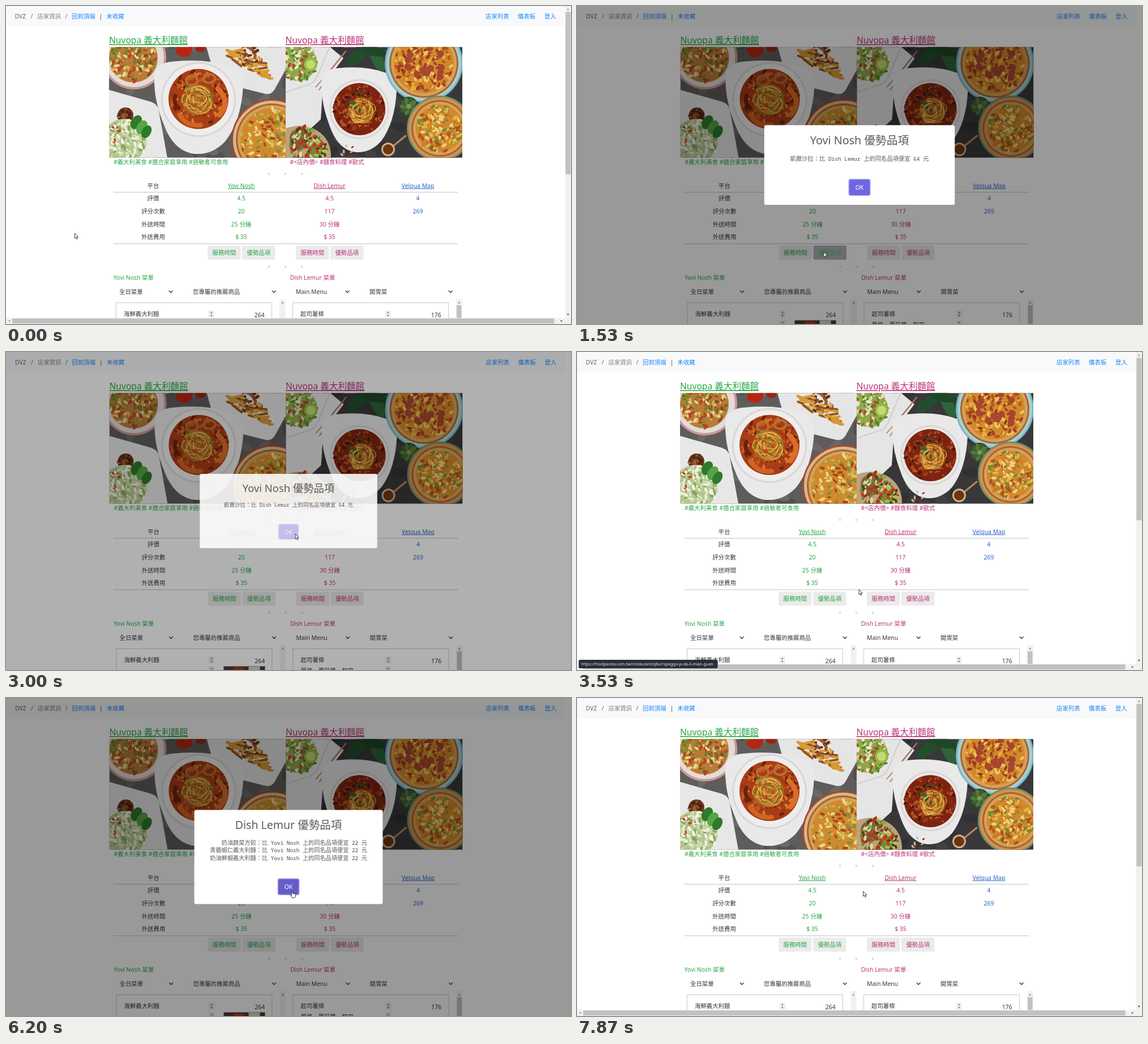
An HTML page that plays this animation: 998x561 px, repeating every 8390 ms.

```html
<!DOCTYPE html>
<html lang="zh-Hant">
<head>
<meta charset="utf-8">
<title>店家資訊</title>
<style>
html, body { margin: 0; width: 100%; height: 100%; overflow: hidden; background: #fff; }
svg { display: block; width: 998px; height: 561px; }
text { font: 10.4px "Noto Sans", "Noto Sans CJK TC", "Noto Sans CJK", sans-serif; white-space: pre; }
.name { font-size: 15.6px; }
.link { text-decoration: underline; }
.mid { text-anchor: middle; }
.end { text-anchor: end; }
.heading { font-size: 19.5px; font-weight: 500; fill: #595959; }
.pre { font-size: 10.2px; fill: #595959; }
.code { font-family: "Noto Sans Mono", monospace; font-size: 9.35px; fill: #444; }
.status { font-size: 7.1px; fill: #e6e8ea; }
</style>
</head>
<body>
<svg id="stage" viewBox="0 0 998 561"></svg>
<script>
const LOOP = 8390, STEP = 1000 / 15; // the screen refreshes 15 times a second
const GREEN = '#28a745', PINK = '#bb3478', BLUE = '#2a66cc', NAV_BLUE = '#1a87ff', INK = '#33383d';
const SHOP = 'Nuvopa 義大利麵館', SERVICE_A = 'Yovi Nosh', SERVICE_B = 'Dish Lemur', MAPS = 'Velqua Map';

let seed = 7;
const rand = () => (seed = (seed * 16807) % 2147483647) / 2147483647;

// Shape helpers
const text = (x, y, s, fill = INK, cls = '') => `<text x="${x}" y="${y}" fill="${fill}" class="${cls}">${s}</text>`;
const rect = (x, y, w, h, fill, more = '') => `<rect x="${x}" y="${y}" width="${w}" height="${h}" fill="${fill}" ${more}/>`;
const oval = (x, y, rx, ry, fill, turn = 0) =>
  `<ellipse cx="${x}" cy="${y}" rx="${rx}" ry="${ry}" fill="${fill}" transform="rotate(${turn} ${x} ${y})"/>`;
const disc = (x, y, r, fill) => oval(x, y, r, r, fill);
const shape = (d, fill) => `<path d="${d}" fill="${fill}"/>`;
const stroke = (d, color, width = 1) =>
  `<path d="${d}" fill="none" stroke="${color}" stroke-width="${width}" stroke-linecap="round"/>`;
const repeat = (n, make) => Array.from({ length: n }, (_, i) => make(i)).join('');

// Food helpers
function scatter(x, y, r, n, size, colors) {
  return repeat(n, i => {
    const a = rand() * 2 * Math.PI, d = r * Math.sqrt(rand()), s = size * (0.6 + rand() * 0.8);
    return oval((x + d * Math.cos(a)).toFixed(1), (y + d * Math.sin(a)).toFixed(1),
      s.toFixed(1), (s * 0.5).toFixed(1), colors[i % colors.length], Math.round(rand() * 180));
  });
}
const noodles = (x, y, r) => disc(x, y, r * 0.9, '#b9792a') + repeat(22, i => {
  const rx = r * (0.35 + rand() * 0.55), ry = r * (0.3 + rand() * 0.5);
  return `<ellipse cx="${x + (rand() - 0.5) * r * 0.5}" cy="${y + (rand() - 0.5) * r * 0.5}" rx="${rx}" ry="${ry}"
    fill="none" stroke="${i % 2 ? '#e9b84c' : '#8f4d18'}" transform="rotate(${rand() * 180} ${x} ${y})"/>`;
});
const bowl = (x, y, w, h) => `<g transform="translate(${x} ${y}) scale(${w / 100} ${h / 100})">` +
  shape('M3 20Q2 2 25 1Q60-2 84 6Q100 9 100 27Q98 65 80 87Q66 101 48 100Q25 98 14 70Q3 45 3 20', '#eae9ea') + '</g>';
const pizza = (x, y, r, rim, plate, toppings) => disc(x, y, r + 8, rim) + disc(x, y, r + 5, plate) +
  disc(x, y, r, '#a9642a') + disc(x, y, r - 3, '#d6a05c') + disc(x, y, r - 8, '#d08a2c') +
  scatter(x, y, r - 9, 170, 4, toppings);

function leftPhoto() {
  return rect(182, 72, 312, 196, '#5e5d5c') + scatter(338, 170, 180, 90, 12, ['#6a6968', '#525150']) +
    disc(226, 90, 57, '#c99a98') + disc(226, 90, 53, '#e4dbd8') + disc(225, 92, 43, '#b67c38') +
    scatter(225, 92, 41, 150, 4, ['#e0b355', '#8a4c22', '#e9d59a', '#b4481f', '#6f8a2d']) +
    disc(314, 75, 15, '#b92412') + disc(343, 71, 10, '#a3200f') + stroke('M300 74q8-8 16-3', '#4c7a2c', 3) +
    shape('M354 72L368 122Q372 133 386 137L458 155Q468 157 474 148L494 112V72Z', '#e6e5e6') +
    repeat(30, () => {
      const x = 388 + rand() * 66, y = 82 + (x - 388) * 0.5 + rand() * 22 - 10;
      return stroke(`M${x} ${y}l${8 + rand() * 14} ${rand() * 16 - 4}`, rand() > 0.4 ? '#d79a34' : '#945419', 4);
    }) + scatter(432, 88, 22, 40, 4, ['#5f3419', '#a5522b', '#d9a24d']) +
    bowl(257, 96, 162, 165) + disc(340, 165, 66, '#d8d6d6') + disc(340, 165, 63, '#efedec') +
    disc(340, 164, 53, '#a93c17') + scatter(340, 164, 50, 150, 4, ['#c65a20', '#6e220e', '#d97b2b', '#933a18']) +
    noodles(338, 165, 31) + stroke('M374 146q24 22 3 46', '#dc6c28', 9) + stroke('M306 192q14 22 38 18', '#cf6423', 8) +
    stroke('M318 133a10 8 0 1 0 20-3a10 8 0 1 0-20 3M350 125a10 7 0 1 0 18 6a10 7 0 1 0-18-6', '#b9702f', 4) +
    stroke('M299 158q-4 14 6 22', '#6a220e', 7) + scatter(340, 158, 26, 12, 3, ['#4d7a2a', '#d13c17']) +
    shape('M182 148L256 169Q268 173 270 185L285 268H182Z', '#e8e7e8') +
    disc(211, 193, 14, '#6b371d') + scatter(211, 193, 13, 24, 3, ['#9c5a30', '#4d2213']) +
    disc(209, 238, 39, '#b5c592') + scatter(209, 238, 38, 160, 4, ['#e6ecd0', '#86a656', '#f3f3e6', '#c8d8a8']) +
    oval(230, 205, 9, 13, '#2f7a2b', 30) + oval(240, 214, 9, 13, '#57a545', 30) + oval(248, 222, 8, 12, '#2f7a2b', 30) +
    scatter(195, 222, 20, 7, 3, ['#d43a1c']) +
    pizza(470, 236, 64, '#a9482c', '#d8b98c', ['#e3c25e', '#c2b45c', '#a94c1c', '#ecd78c', '#7f8f3c']);
}

function rightPhoto() {
  return rect(494, 72, 312, 196, '#38383a') + scatter(650, 170, 180, 60, 14, ['#414143', '#313133']) +
    shape('M494 72H572L596 92L560 140L556 200L532 222L494 222Z', '#e6e5e5') +
    stroke('M494 152L530 140Q543 138 549 126L572 72', '#cfcecd', 2) + disc(515, 98, 34, '#93a64c') +
    scatter(516, 98, 34, 130, 4, ['#d9dfb5', '#5d862a', '#efe9cf', '#a84e2a', '#87ad42']) +
    disc(538, 103, 12, '#8ebd3f') + disc(538, 103, 8, '#c3d977') +
    stroke('M600 80L558 132', '#a9745c', 2.5) + stroke('M563 125l-16 18M567 128l-14 20', '#a9745c', 1.5) +
    oval(622, 88, 26, 10, '#234e2c', -40) + oval(655, 92, 27, 10, '#2d6337', 65) + oval(645, 78, 28, 9, '#1e4727', 15) +
    bowl(553, 108, 137, 150) + disc(624, 182, 53, '#d9d7d7') + disc(624, 182, 50, '#ebe8e6') +
    disc(624, 182, 46, '#7c2411') + scatter(624, 182, 44, 160, 3.5, ['#9f3b18', '#4a160b', '#b95425', '#7c2411']) +
    noodles(627, 184, 25) + oval(612, 170, 7, 4, '#42622a', 20) + scatter(622, 168, 18, 14, 3, ['#c04a1f', '#38541f']) +
    pizza(738, 101, 61, '#7db4c0', '#a6d0d6', ['#e6b13c', '#b5581d', '#a53d28', '#edc75c', '#983626']) +
    repeat(12, () => disc(702 + rand() * 72, 72 + rand() * 66, 6, '#a8452f')) +
    disc(711, 177, 17, '#2f4a26') + repeat(10, i => oval(711 + 9 * Math.cos(i * 0.63), 177 + 9 * Math.sin(i * 0.63), 7, 4,
      i % 2 ? '#56763c' : '#405f30', i * 36)) + disc(711, 177, 4, '#7a9a56') +
    pizza(766, 216, 50, '#6f8f62', '#d39155', ['#e3b646', '#b54c1f', '#f0d27a', '#6f8a36', '#c87c2a']) +
    shape('M494 216Q525 205 550 220Q575 236 574 268H494Z', '#bfa27c') + disc(520, 234, 19, '#806038') +
    scatter(528, 243, 30, 110, 4.5, ['#5f8d31', '#b3341c', '#e4d3a5', '#5f3a1f', '#86ab45']) +
    disc(551, 254, 15, '#6b8f35') + scatter(551, 254, 14, 20, 5, ['#c93a22', '#a4bf5b', '#5a3219']) +
    stroke('M684 247L706 229', '#b98858', 3) + disc(675, 253, 12, '#d3b28c') + disc(675, 253, 9, '#6d3512') +
    scatter(603, 256, 14, 8, 3, ['#8a2a18', '#c2b59c']);
}

// Page
const button = (id, x, label, color) => rect(x, 422.5, 58.4, 25, '#ebebeb', 'rx="2.6"') +
  `<g id="${id}" opacity="0">${rect(x, 422.5, 58.4, 25, '#6c757d', 'rx="2.6"')}</g>` +
  text(x + 29.2, 438.8, label, color, 'mid') +
  `<g id="${id}Text" opacity="0">${text(x + 29.2, 438.8, label, '#fff', 'mid')}</g>`;
const dots = y => [464.5, 493.5, 522.5].map(x => disc(x, y, 2.2, '#e2e2e2')).join('');
const chevron = x => stroke(`M${x - 3} 502.5l3 3l3-3`, '#343a40', 1.3);
const triangle = (x, y, dx, dy, fill) =>
  shape(`M${x + dx} ${y + dy}L${x - dx + dy} ${y - dy + dx}L${x - dx - dy} ${y - dy - dx}Z`, fill);
const spinner = (x, y) => rect(x - 5, y - 6, 10, 12, '#ececec') +
  triangle(x, y - 3, 0, -1.4, '#666') + triangle(x, y + 3, 0, 1.4, '#666');

function row(y, label, a, b, c = '', cls = 'mid') {
  return text(260, y, label, INK, 'mid') + text(415.5, y, a, GREEN, cls) +
    text(571.5, y, b, PINK, cls) + text(727.5, y, c, BLUE, cls);
}
function menu(x, title, color, category, section, dish, price) {
  return text(x, 483, title, color) + text(x + 10.3, 507.6, category) + chevron(x + 101.5) +
    text(x + 140.4, 507.6, section) + chevron(x + 283.5) +
    `<rect x="${x + 4.7}" y="523.6" width="275" height="60" fill="#fff" stroke="#bdbdbd" stroke-width=".8"/>` +
    text(x + 18.3, 547, dish) + spinner(x + 173, 543.5) + text(x + 267, 548.8, price, INK, 'end') +
    rect(x + 293.5, 517, 10.5, 44, '#f1f1f1') + triangle(x + 298.7, 523, 0, -1.8, '#888') + spinner(x + 173, 561);
}
const page = () =>
  rect(-1, 0, 988.5, 36, '#f8f9fa') + text(15.5, 21.7, 'DVZ', '#666') + text(43.5, 21.7, '/', '#666') +
  text(55.5, 21.7, '店家資訊', '#808080') + text(104.5, 21.7, '/', '#666') +
  text(116, 21.7, '回到頂端', NAV_BLUE) + text(164.5, 21.7, '|', '#444') + text(177.5, 21.7, '未收藏', NAV_BLUE) +
  text(847, 21.7, '店家列表', NAV_BLUE) + text(904, 21.7, '儀表板', NAV_BLUE) + text(951, 21.7, '登入', NAV_BLUE) +
  text(182, 66.4, SHOP, GREEN, 'name link') + text(493.5, 66.4, SHOP, PINK, 'name link') +
  `<g clip-path="url(#leftClip)">${leftPhoto()}</g><g clip-path="url(#rightClip)">${rightPhoto()}</g>` +
  text(190, 279, '#義大利美食 #適合家庭享用 #過敏者可食用', GREEN) +
  text(501.5, 279, '#&lt;店內價&gt; #麵食料理 #歐式', PINK) + dots(296) +
  row(320.7, '平台', SERVICE_A, SERVICE_B, MAPS, 'mid link') + row(343.3, '評價', '4.5', '4.5', '4') +
  row(366.2, '評分次數', '20', '117', '269') + row(388.7, '外送時間', '25 分鐘', '30 分鐘') +
  row(411.4, '外送費用', '$ 35', '$ 35') +
  rect(189.5, 328, 608.5, 1, '#c4c4c4') + rect(189.5, 419, 608.5, 1, '#c4c4c4') +
  button('hoursA', 356.2, '服務時間', GREEN) + button('dealsA', 417.1, '優勢品項', GREEN) +
  button('hoursB', 512.1, '服務時間', PINK) + button('dealsB', 573, '優勢品項', PINK) + dots(460) +
  menu(189.7, SERVICE_A + ' 菜單', GREEN, '全日菜單', '您專屬的推薦商品', '海鮮義大利麵', '264') +
  menu(501.7, SERVICE_B + ' 菜單', PINK, 'Main Menu', '開胃菜', '起司薯條', '176') +
  rect(796, 528, 8.5, 33, '#c1c1c1') + text(520, 565.5, '薯條、蘑菇醬、起司') +
  rect(384, 554.5, 73, 7, '#4d3a34') + rect(402, 556, 18, 5, '#a83a1c') + rect(428, 555, 20, 6, '#d9d4cc');

const scrollbars = () => rect(987.5, 0, 10.5, 561, '#f1f1f1') + rect(0, 550.3, 998, 10.7, '#f1f1f1') +
  rect(988.3, 10.5, 9, 286.5, '#c1c1c1') + rect(11, 551.2, 957.5, 8.8, '#c1c1c1') +
  triangle(992.7, 5.5, 0, -1.7, '#8a8a8a') + triangle(992.7, 544.5, 0, 1.7, '#505050') +
  triangle(5.5, 555.6, -1.7, 0, '#8a8a8a') + triangle(981.5, 555.6, 1.7, 0, '#505050');

// Popups are drawn around their own centre.
const code = s => `<tspan class="code"> ${s} </tspan>`;
const deal = (dish, rival, saving) => `${dish}：比${code(rival)}上的同名品項便宜${code(saving)}元`;
const popup = (id, height, titleY, title, lines, okY) => `<g id="${id}">` +
  rect(-166.4, -height / 2, 332.8, height, '#fff', 'rx="3.2"') + text(0, titleY, title, '#595959', 'heading mid') + lines +
  `<g id="${id}Ok" fill="#7066e0"><rect x="-19.5" y="${okY - 15}" width="39" height="30" rx="4" fill-opacity=".5"/>` +
  `<rect x="-18" y="${okY - 13.6}" width="36" height="27.2" rx="2.6"/></g>` + text(0, okY + 3.8, 'OK', '#fff', 'mid') + '</g>';

const SCHEME = 'https:';
const stage = document.getElementById('stage');
stage.innerHTML =
  `<defs><clipPath id="leftClip">${rect(182, 72.5, 312, 195)}</clipPath>
   <clipPath id="rightClip">${rect(494, 72.5, 312, 195)}</clipPath></defs>
   <g id="page">${page()}</g><g id="bars">${scrollbars()}</g>
   <g id="status">${rect(3, 543, 245.5, 15, '#292e36', 'rx="2.5"') +
     text(7.3, 553.2, SCHEME + '//foodpanda.com.tw/restaurant/q8ur/spaggo-yi-da-li-mian-guan', '#e6e8ea', 'status')}</g>
   ${rect(0, 0, 998, 561, '#000', 'id="shade"')}` +
  popup('popupA', 139.2, -36, SERVICE_A + ' 優勢品項', text(0, -7.8, deal('凱撒沙拉', SERVICE_B, '64'), '#595959', 'pre mid'), 39) +
  popup('popupB', 166, -49.5, SERVICE_B + ' 優勢品項',
    ['奶油蔬菜方餃', '青醬蝦仁義大利麵', '奶油鮮蝦義大利麵'].map((dish, i) =>
      text(139, -21.8 + i * 13.5, deal(dish, SERVICE_A, '22'), '#595959', 'pre end')).join(''), 52.5) +
  `<g id="cursor" stroke="#111" stroke-width=".8" stroke-linejoin="round">
   <path id="arrow" fill="#fff" d="M0 0V8.8L2 7L3.4 10.2L4.9 9.5L3.5 6.4H6.2Z"/>
   <path id="hand" fill="#fff" d="M-.9 .6Q0-.5.9.6V4Q2 3.2 2.8 4.3Q3.8 3.7 4.5 4.8Q6 4.4 6 6V8.2Q6 10 4.8 11.4H-.3L-3.2 7.4Q-3.2 6.1-1.8 6.5L-.9 7.4Z"/></g>`;
const part = id => document.getElementById(id);

// Motion
const clamp = v => Math.min(1, Math.max(0, v));
function ease(x) { // cubic-bezier(.25, .1, .25, 1)
  let low = 0, high = 1, u = 0.5;
  for (let i = 0; i < 16; i++) {
    u = (low + high) / 2;
    if (0.75 * u * (1 - u) + u ** 3 < x) low = u; else high = u;
  }
  return x <= 0 ? 0 : x >= 1 ? 1 : 0.3 * u * (1 - u) ** 2 + 3 * u * u * (1 - u) + u ** 3;
}
function track(keys, t, curve = v => v) {
  const i = keys.findIndex(k => k[0] > t);
  if (i < 1) return keys[i ? keys.length - 1 : 0].slice(1);
  const a = keys[i - 1], b = keys[i], k = curve((t - a[0]) / (b[0] - a[0]));
  return a.slice(1).map((v, j) => v + (b[j + 1] - v) * k);
}
const within = (t, spans) => spans.some(([a, b]) => t >= a && t < b);
const hover = (t, from, to) => clamp((t - from) / 150) - clamp((t - to) / 150);

const POPUPS = [
  { id: 'popupA', show: 1373, over: 2450, press: 2860, hide: 2983 },
  { id: 'popupB', show: 4663, over: 6090, press: 7395, hide: 7530 },
];
const SHOW = [[0, 0.7], [135, 1.05], [240, 0.95], [300, 1]];
const CURSOR = [
  [0, 121.5, 401], [200, 138, 412], [330, 188, 438], [470, 268, 455], [600, 345, 453], [670, 380, 445], [780, 420, 437],
  [930, 436, 434], [1630, 436, 434], [1800, 446, 426], [2000, 471, 402], [2200, 496, 378], [2400, 507, 341],
  [2600, 511, 321], [3070, 511, 321], [3230, 544, 319], [3400, 512, 378], [3533, 498, 419], [3670, 502, 424],
  [3800, 516, 450], [3930, 541, 462], [4070, 574, 444], [4130, 581, 436.5], [5540, 581, 436.5],
  [5730, 570, 422], [5900, 540, 385], [6030, 518, 356], [6200, 505.5, 341], [LOOP, 505.5, 341],
];
const HAND = [[620, 1390], [2450, 2983], [3210, 3300], [4080, 4690], [6090, 7530]];

function setHover(id, level) {
  part(id).setAttribute('opacity', level);
  part(id + 'Text').setAttribute('opacity', level * 0.65);
}
const toggle = (id, visible) => part(id).setAttribute('visibility', visible ? 'visible' : 'hidden');

function draw(t) {
  let shade = 0, open = false;
  for (const { id, show, over, press, hide } of POPUPS) {
    const visible = t >= show && t < hide + 150, leave = ease((t - hide) / 150);
    toggle(id, visible);
    if (!visible) continue;
    open = true;
    shade = 0.4 * (ease((t - show) / 100) - ease((t - hide) / 100));
    const scale = track(SHOW, t - show, ease)[0] * (1 - leave / 2);
    part(id).setAttribute('transform', `translate(499 280.5) scale(${scale})`);
    part(id).setAttribute('opacity', 1 - leave);
    const ok = part(id + 'Ok');
    ok.setAttribute('fill', t >= hide || t < over ? '#7066e0' : t >= press ? '#5a52b3' : '#655cca');
    ok.setAttribute('opacity', t >= hide ? 0.4 : 1);
  }
  part('shade').setAttribute('opacity', shade);
  part('page').setAttribute('transform', `translate(${open ? 0.5 : 0} 0)`);
  toggle('bars', !open);
  toggle('status', within(t, [[3260, 3660]]));
  setHover('hoursA', hover(t, 620, 770));
  setHover('dealsA', hover(t, 770, 1455));
  setHover('dealsB', hover(t, 4080, 4748));

  const [x, y] = track(CURSOR, t), hand = within(t, HAND);
  part('cursor').setAttribute('transform', `translate(${x} ${y})`);
  toggle('arrow', !hand);
  toggle('hand', hand);
}

const start = performance.now();
function tick() {
  const t = (performance.now() - start) % LOOP;
  draw(Math.floor((t + 5) / STEP) * STEP);
  requestAnimationFrame(tick);
}
tick();
</script>
</body>
</html>
```
